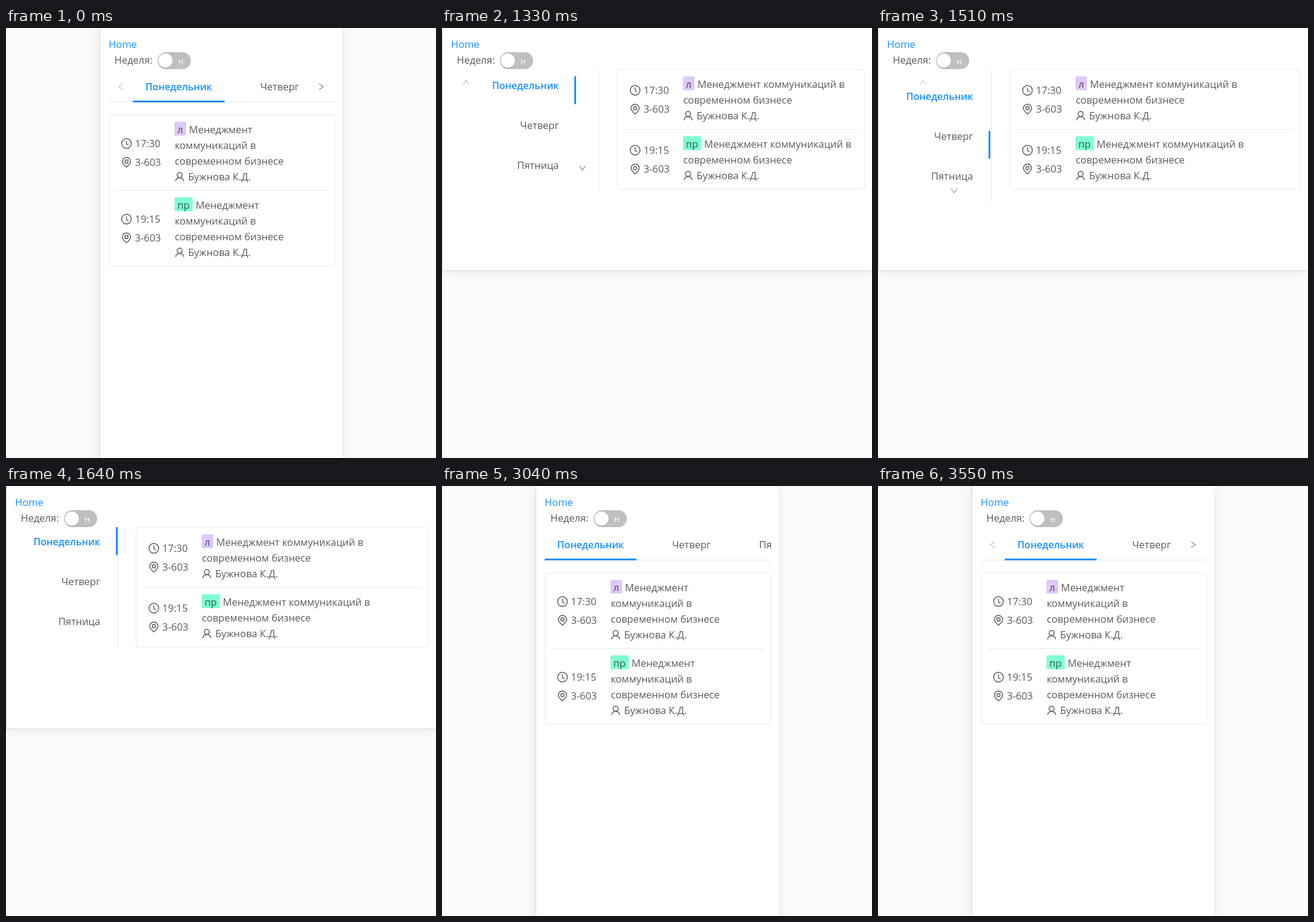
An HTML page for the animation above (3910 ms loop, 712x711 px).

```html
<!DOCTYPE html>
<html lang="ru">
<head>
<meta charset="utf-8">
<style>
html, body { margin: 0; width: 100%; height: 100%; overflow: hidden; background: #fafafa; }
#panel {
  position: absolute; top: 0; overflow: hidden; background: #fff;
  box-shadow: 0 0 16px rgba(0,0,0,.08), inset 1px -1px #d9d9d9;
}
#panel > svg { display: block; }
text { font: 16.5px "Open Sans", "Noto Sans", sans-serif; fill: rgba(0,0,0,.65); }
.blue { fill: #1890ff; }
.active { font-weight: 600; font-size: 16.1px; fill: #1890ff; }
.mid { text-anchor: middle; }
.end { text-anchor: end; }
.line { fill: #e8e8e8; }
.icon { fill: none; stroke: #595959; stroke-width: 1.45; }
</style>
</head>
<body>
<div id="panel"><svg id="view" width="712" height="740"></svg></div>
<script>
const panel = document.getElementById('panel'), view = document.getElementById('view');
const LOOP = 3910, DUR = 300;
const ROTATE = 1230, VERTICAL = 1280, BACK = 2990, HORIZONTAL = 3040;
const GROW = 1256, SHRINK = 1425, REOPEN = 3240;
// moments at which the picture is refreshed
const TICKS = [0, ROTATE, VERTICAL, 1320, 1370, 1410, 1460, 1500, 1550, 1590, 1640,
  BACK, HORIZONTAL, 3220, 3270, 3320, 3350, 3400, 3450, 3500, 3550];
const DAYS = ['Понедельник', 'Четверг', 'Пятница'];
const TEACHER = 'Бужнова К.Д.';

// cubic-bezier(.645, .045, .355, 1)
function ease(x) {
  if (x <= 0) return 0;
  if (x >= 1) return 1;
  const curve = (u, a, b) => 3 * u * (1 - u) ** 2 * a + 3 * u * u * (1 - u) * b + u ** 3;
  let lo = 0, hi = 1;
  for (let i = 0; i < 24; i++) {
    const mid = (lo + hi) / 2;
    if (curve(mid, .645, .355) < x) lo = mid; else hi = mid;
  }
  return curve(lo, .045, 1);
}

const text = (x, y, s, cls = '') => `<text x="${x}" y="${y + 6}" class="${cls}">${s}</text>`;
const rect = (x, y, w, h, attrs) => `<rect x="${x}" y="${y}" width="${w}" height="${h}" ${attrs}/>`;
const line = (x, y, w, h) => rect(x, y, w, h, 'class="line"');
const icon = (x, y, shape) => `<g class="icon" transform="translate(${x} ${y})">${shape}</g>`;
const chevron = (x, y, angle, shade, alpha) =>
  `<path d="M3.5-5L-3.5 0L3.5 5" transform="translate(${x} ${y}) rotate(${angle})"
    fill="none" stroke="#000" stroke-width="1.1" opacity="${shade * alpha}"/>`;

const CLOCK = '<circle r="8"/><path d="M0-4.7V.6L3.3 3"/>';
const PIN = '<path d="M0 8.2C-3 5.6-6.8 2.6-6.8-1.2a6.8 6.8 0 0 1 13.6 0C6.8 2.6 3 5.6 0 8.2z"/><circle cy="-1.3" r="2.7"/>';
const USER = '<circle cy="-2.8" r="4.2"/><path d="M-6.6 7.6a6.6 6.2 0 0 1 13.2 0"/>';

const header = text(15, 27, 'Home', 'blue') + text(24.5, 53, 'Неделя:') +
  rect(96, 40, 55, 28, 'rx="14" fill="#bfbfbf"') +
  '<circle cx="109" cy="55.5" r="11.7" fill="#000" opacity=".12"/>' +
  '<circle cx="109" cy="54" r="11.7" fill="#fff"/>' +
  '<text x="130" y="60" style="font-size:14px;fill:#fff">н</text>';

function lesson(x, y, h, time, tag, tagW, color, lines) {
  const mid = y + h / 2, left = Math.round(x + 109), first = y + 25;
  return icon(x + 29.5, mid - 14.5, CLOCK) + text(x + 43.5, mid - 14.5, time) +
    icon(x + 29.5, mid + 16.5, PIN) + text(x + 43.5, mid + 16.5, '3-603') +
    rect(left, y + 12, tagW, 23, `rx="2" fill="${color}"`) +
    text(left + tagW / 2, first, tag, 'mid') +
    lines.map((s, i) => text(left + (i ? .4 : tagW + 5), first + 26 * i, s)).join('') +
    icon(left + 8.5, first + 26 * lines.length, USER) +
    text(left + 22.4, first + 26 * lines.length, TEACHER);
}

function card(x, right, y, h, lines) {
  const edge = Math.round(x);
  return rect(edge + .5, y + .5, right - edge - 1, 2 * h, 'rx="4" fill="none" stroke="#e8e8e8"') +
    line(edge + 11, y + h, right - edge - 23, 1) +
    lesson(x, y, h, '17:30', 'л', 19, '#dfc8fb', lines) +
    lesson(x, y + h, h, '19:15', 'пр', 30, '#7fffd4', lines);
}

function horizontal(ms) {
  const open = ms < VERTICAL ? 1 : ease((ms - REOPEN) / DUR), pad = 40 * open;
  return line(15, 122, 375, 1) +
    `<svg x="${15 + pad}" y="80" width="${375 - 2 * pad}" height="43">` +
    text(76, 17, DAYS[0], 'active mid') + text(243, 17, DAYS[1], 'mid') + text(355, 17, DAYS[2]) +
    rect(0, 40, 152, 3, 'class="blue"') + '</svg>' +
    chevron(15 + pad / 2, 97, 0, .25, open) + chevron(387 - pad / 2, 97, 180, .5, open) +
    card(15, 390, 143, 125, ['Менеджмент', 'коммуникаций в', 'современном бизнесе']);
}

function vertical(ms) {
  const grown = at => ease((at - GROW) / DUR), peak = grown(SHRINK);
  const side = 40 * (1 - grown(ms));
  const closed = ease((ms - SHRINK) / (DUR * peak));
  const reach = grown(Math.min(ms, SHRINK)), open = reach * (1 - closed);
  const top = 68 + 40 * open, right = 184.3 + 2 * side, bottom = 246 + 80 * open;
  const arrowW = (40 + 165 * reach) * (1 - closed);
  return line(Math.floor(right), 68, 1, 199) + line(Math.round(right), 68, 1, bottom - 68) +
    DAYS.map((s, i) => text(156 + side, top + 24 + 66 * i, s, i ? 'end' : 'active end')).join('') +
    rect(Math.round(182 + side), top + 152 * open, 3, 46, 'class="blue"') +
    chevron(15 + arrowW / 2, 90, 90, .3, 1 - closed) +
    chevron(right - 1.5 - arrowW / 2, bottom - 19.5, -90, .55, 1 - closed) +
    card(right + 31, 700, 68, 99, ['Менеджмент коммуникаций в', 'современном бизнесе']);
}

function draw(ms) {
  const portrait = ms < ROTATE || ms >= BACK;
  panel.style.left = portrait ? '155px' : '0';
  panel.style.width = portrait ? '402px' : '712px';
  panel.style.height = portrait ? '740px' : '402px';
  view.innerHTML = header + (ms >= VERTICAL && ms < HORIZONTAL ? vertical(ms) : horizontal(ms));
}

const start = performance.now();
let shown = -1;
function frame(now) {
  const t = Math.max(0, now - start) % LOOP;
  const ms = TICKS.filter(m => m <= t).pop();
  if (ms !== shown) draw(shown = ms);
  requestAnimationFrame(frame);
}
frame(start);
</script>
</body>
</html>
```
